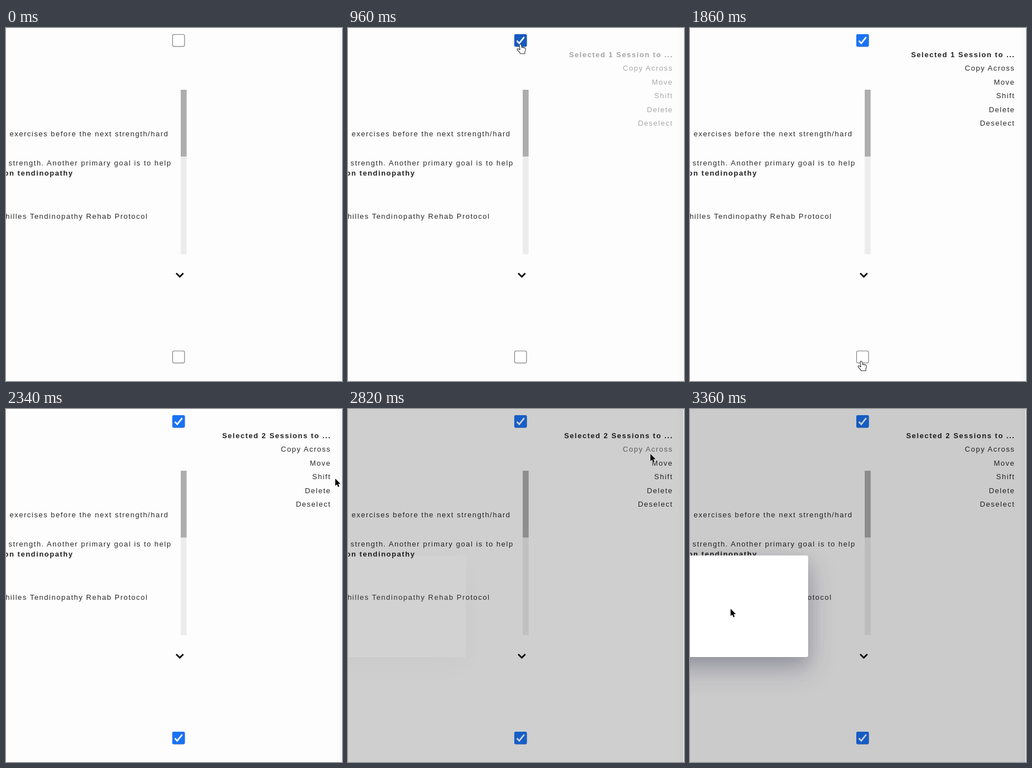
Write an HTML page that moves like this. It is 600 px wide and 629 px high and loops after 3420 ms.

```html
<!DOCTYPE html>
<html lang="en">
<head>
<meta charset="utf-8">
<title>Session selection</title>
<style>
  html, body { margin: 0; width: 100%; height: 100%; overflow: hidden; background: #fdfdfd; }
  svg { position: absolute; left: 0; top: 0; }
  text { font: 13px "Liberation Sans", Arial, sans-serif; letter-spacing: 1.5px; fill: #2a2a2a; text-anchor: end; white-space: pre; }
  .bold { font-weight: bold; fill: #222; }
  .empty { fill: #fff; stroke: #808080; stroke-width: 1.2; }
  .tick { fill: none; stroke: #fff; stroke-width: 2.7; }
  #modal {
    position: absolute; left: -260px; top: 261px; width: 471px; height: 181px;
    background: #fff; border-radius: 3px;
    box-shadow: 0 20px 50px rgba(50,50,93,.28), 0 12px 27px rgba(0,0,0,.12);
  }
</style>
</head>
<body>
<svg width="600" height="629">
  <defs>
    <linearGradient id="edge"><stop stop-color="#fdfdfd"/><stop offset="1" stop-color="#f7f7f8"/></linearGradient>
  </defs>
  <rect x="588" width="12" height="629" fill="url(#edge)"/>
  <text x="290.5" y="193">of exercises before the next strength/hard</text>
  <text x="295.7" y="245">strength. Another primary goal is to help</text>
  <text x="120.2" y="263" class="bold">on tendinopathy</text>
  <text x="253.7" y="340">Achilles Tendinopathy Rehab Protocol</text>
  <rect x="312" y="110" width="10.5" height="293" fill="#ececec"/>
  <rect x="312" y="110" width="10.5" height="119" fill="#adadad"/>
  <path d="M304 437l6.3 6.3 6.3-6.3" fill="none" stroke="#0a0a0a" stroke-width="2.8"/>
  <g id="boxes"></g>
  <g id="menu"></g>
  <rect id="shade" width="599" height="629"/>
</svg>
<div id="modal"></div>
<svg width="600" height="629">
  <g id="cursor">
    <path id="arrow" d="M0 0V13L3 10.3L5 15L7.2 14L5.2 9.6H9.3Z" fill="#000" stroke="#fff" stroke-width="1" paint-order="stroke"/>
    <path id="hand" d="M-2 1.2Q-1.6-.6 0-.3Q1.2 0 1.5 1.5L2.4 6Q3 4.9 4.6 5.6L5 6.3Q6 5.4 7.2 6.6Q8.8 6.2 9 8Q9.3 11 7.8 13.5V16.8H-.2Q-1 14.5-3.5 12.5Q-6 10-6 8.6Q-5 7.2-3.4 8.2L-1 10Z" fill="#fff" stroke="#333" stroke-width="1.1" stroke-linejoin="round"/>
  </g>
</svg>
<script>
const LOOP = 3420, STEP = 60;
const $ = id => document.getElementById(id);
const ramp = (t, a, b) => Math.min(1, Math.max(0, (t - a) / (b - a)));
const show = (el, on) => el.style.display = on ? '' : 'none';

// Cursor stops: time, x, y
const stops = [
  [300, -20, 330], [780, 308, 29], [1140, 308, 29], [1680, 306, 594], [1920, 306, 594],
  [2340, 588, 124], [2640, 540, 80], [2880, 540, 80], [3300, 72.5, 356]
];
const boxes = [{ y: 22, at: 840 }, { y: 586, at: 1920 }];
const items = ['', 'Copy Across', 'Move', 'Shift', 'Delete', 'Deselect'];

$('boxes').innerHTML = boxes.map(b => `<g transform="translate(308 ${b.y})">
  <rect class="empty" x="-10.5" y="-10.5" width="21.3" height="21.3" rx="2.5"/>
  <g><rect x="-11" y="-11" width="22.3" height="22.3" rx="2.5"/><path class="tick" d="M-6.5.8L-2.2 5.2L6.7-5.8"/></g></g>`).join('');
$('menu').innerHTML = items.map((s, i) =>
  `<text x="580.3" y="${52 + 24.45 * i}"${i ? '' : ' class="bold"'}>${s}</text>`).join('');
const [title, copy] = $('menu').children;

function cursorAt(t) {
  let i = 0;
  while (i < stops.length - 2 && t > stops[i + 1][0]) i++;
  const [t0, x0, y0] = stops[i], [t1, x1, y1] = stops[i + 1];
  const k = ramp(t, t0, t1), e = k * k * (3 - 2 * k);
  return [x0 + (x1 - x0) * e, y0 + (y1 - y0) * e];
}

function draw(t) {
  const [x, y] = cursorAt(t);
  const open = t >= 2820;
  let hand = !open && t > 1140 && x > 490 && x < 581 && y > 60 && y < 180;

  boxes.forEach((b, i) => {
    const over = !open && Math.abs(x - 308) < 11 && Math.abs(y - b.y) < 11;
    const mark = $('boxes').children[i].lastElementChild;
    show(mark, t >= b.at);
    mark.firstElementChild.setAttribute('fill', over ? '#175ac0' : '#1a73f5');
    hand = hand || over;
  });

  $('menu').style.opacity = ramp(t, 840, 1140);
  title.textContent = t < 1920 ? 'Selected 1 Session to ...' : 'Selected 2 Sessions to ...';
  copy.style.opacity = 1 - .45 * (ramp(t, 2580, 2760) - ramp(t, 2790, 2910));

  $('shade').style.opacity = .2 * ramp(t, 2760, 2825);
  $('modal').style.opacity = ramp(t, 2808, 2990);

  $('cursor').setAttribute('transform', `translate(${x} ${y})`);
  show($('hand'), hand);
  show($('arrow'), !hand);
}

const start = performance.now();
function tick() {
  const t = (performance.now() - start) % LOOP;
  draw(Math.floor(t / STEP) * STEP);
  requestAnimationFrame(tick);
}
tick();
</script>
</body>
</html>
```
